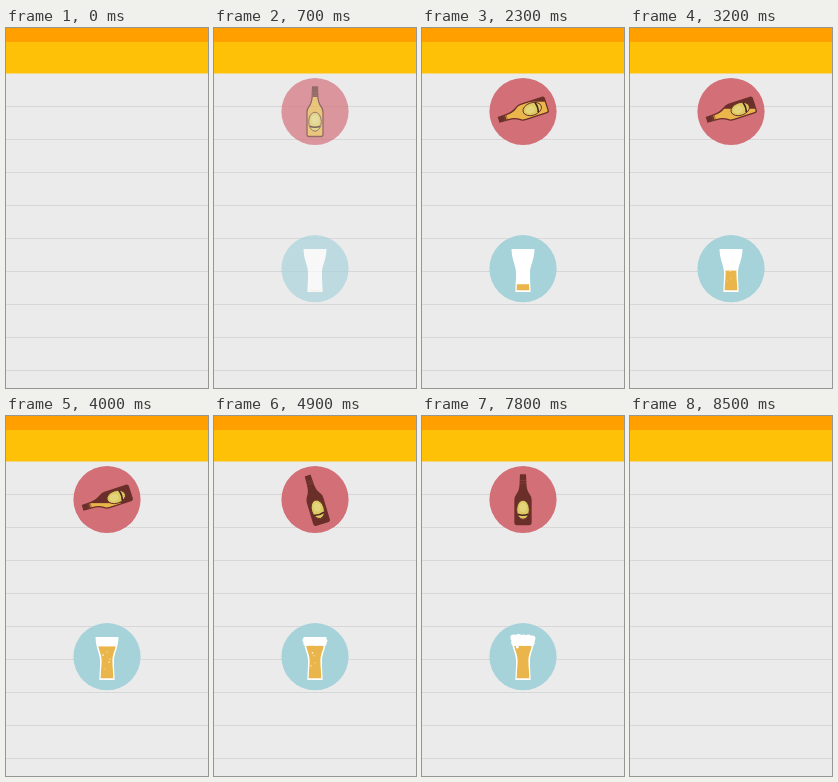
These frames come from a looping animation (202x360 px, 8600 ms). An HTML page:

```html
<!DOCTYPE html>
<html>
<head>
<meta charset="utf-8">
<style>
html, body { margin: 0; width: 100%; height: 100%; overflow: hidden; background: #ebebeb; }
svg { display: block; width: 202px; height: 360px; }
</style>
</head>
<body>
<svg viewBox="0 0 202 360">
  <defs>
    <path id="bottle" d="M98.6 59H103.4L103.8 68C104 74 105.2 76 107 78.5Q109 81 109 84V106.5Q109 108.5 107 108.5H95Q93 108.5 93 106.5V84Q93 81 95 78.5C96.8 76 98 74 98.2 68Z"/>
    <path id="beerShape" d="M91 222H111C110.6 232 106.6 237 106.4 244C106.3 250 107.3 256 107.3 262.3H94.7C94.7 256 95.7 250 95.6 244C95.4 237 91.4 232 91 222Z"/>
    <clipPath id="inBottle"><use href="#bottle"/></clipPath>
    <clipPath id="inBeer"><use href="#beerShape"/></clipPath>
  </defs>

  <rect width="202" height="360" fill="#ebebeb"/>
  <g id="lines" stroke="#d0d0d0" stroke-dasharray="1.5 .5"></g>
  <rect y="14" width="202" height="31.5" fill="#ffc107"/>
  <rect width="202" height="14" fill="#ffa000"/>

  <g id="scene">
    <circle cx="101" cy="83.5" r="33.6" fill="#d26f77"/>
    <g id="tilt">
      <use href="#bottle" fill="#6b2f2a"/>
      <g clip-path="url(#inBottle)">
        <rect id="liquid" x="50" width="102" height="100" fill="#eab54a"/>
        <rect x="95" y="56" width="12" height="10" fill="#6b2f2a"/>
      </g>
      <use href="#bottle" fill="none" stroke="#6b2f2a" stroke-width="1.3"/>
      <path d="M98 64.5H104M98 67H104" stroke="#84473a" stroke-width=".6"/>
      <ellipse cx="101" cy="93.7" rx="6.3" ry="9.5" fill="#dccb62" stroke="#6b2f2a" stroke-width=".9"/>
      <path d="M95.8 98.3Q101 100.3 106.2 98.3" fill="none" stroke="#4b211f" stroke-width="1.6"/>
      <ellipse cx="101" cy="91.5" rx="3.6" ry="4.6" fill="#e4d57c"/>
    </g>

    <circle cx="101" cy="240.7" r="33.6" fill="#a6d2da"/>
    <path d="M89.5 221H112.5C112.3 232 108.3 237 108 244C107.8 251 108.6 258 108.6 264H93.4C93.4 258 94.2 251 94 244C93.7 237 89.7 232 89.5 221Z" fill="#fff"/>
    <g clip-path="url(#inBeer)">
      <rect id="beer" x="88" width="26" height="50" fill="#eab54a"/>
      <g id="bubbles" fill="#fff7dc"></g>
    </g>
    <g id="foam" fill="#fff">
      <rect x="89.5" y="221" width="23" height="8.5" rx="2"/>
      <circle cx="91.7" cy="221.7" r="3.3"/>
      <circle cx="96.5" cy="221.3" r="3.4"/>
      <circle cx="101.5" cy="222" r="3.5"/>
      <circle cx="106.3" cy="221.8" r="3.2"/>
      <circle cx="110.3" cy="222.6" r="3.1"/>
      <circle cx="109" cy="227" r="3.3"/>
      <circle cx="92.5" cy="227" r="3"/>
      <circle cx="103" cy="227" r="3"/>
      <rect id="drip" x="94" y="226" width="2.6" rx="1.3"/>
    </g>
  </g>
</svg>
<script>
const LOOP = 8600, TILT = -108;
const $ = id => document.getElementById(id);
const set = (el, attrs) => { for (const k in attrs) el.setAttribute(k, attrs[k]); };
const add = (parent, tag, attrs) => {
  const el = document.createElementNS('http://www.w3.org/2000/svg', tag);
  set(el, attrs);
  return parent.appendChild(el);
};
const ramp = (t, a, b) => Math.min(1, Math.max(0, (t - a) / (b - a)));
const ease = p => p * p * (3 - 2 * p);

for (let y = 78.5; y < 360; y += 33) add($('lines'), 'path', { d: `M0 ${y}H202` });
const bubbles = [97, 100, 103, 101, 98.5, 104].map((x, i) =>
  add($('bubbles'), 'circle', { cx: x, r: i % 2 ? .6 : .85 }));

function draw(t) {
  set($('scene'), { opacity: ramp(t, 300, 890) * (1 - ramp(t, 8000, 8450)) });

  const angle = TILT * (ease(ramp(t, 1100, 1900)) - ease(ramp(t, 4300, 5100)));
  const drain = 69 + 18 * ramp(t, 1700, 4000) + 40 * ramp(t, 4000, 4300);
  set($('tilt'), { transform: `rotate(${angle} 101 84)` });
  // Keeps the surface level while the bottle turns
  set($('liquid'), { y: drain, transform: `rotate(${-angle} 101 84)` });

  set($('beer'), { y: 262.3 - 32.6 * ramp(t, 1900, 4050) });

  const fizz = ramp(t, 2900, 3300) * (1 - ramp(t, 6400, 7000));
  bubbles.forEach((b, i) => {
    const rise = (t / 1500 + i * .37) % 1;
    set(b, { cy: 257 - 27 * rise, opacity: fizz * ramp(rise, 0, .5) });
  });

  const grow = ease(ramp(t, 4300, 5300));
  set($('foam'), { opacity: ramp(t, 4300, 4600), transform: `translate(0 ${229 * (1 - grow)}) scale(1 ${grow})` });
  set($('drip'), { height: 3 + 3.5 * ramp(t, 5200, 6200) });
}

const start = performance.now();
function tick() {
  draw((performance.now() - start) % LOOP);
  requestAnimationFrame(tick);
}
tick();
</script>
</body>
</html>
```
